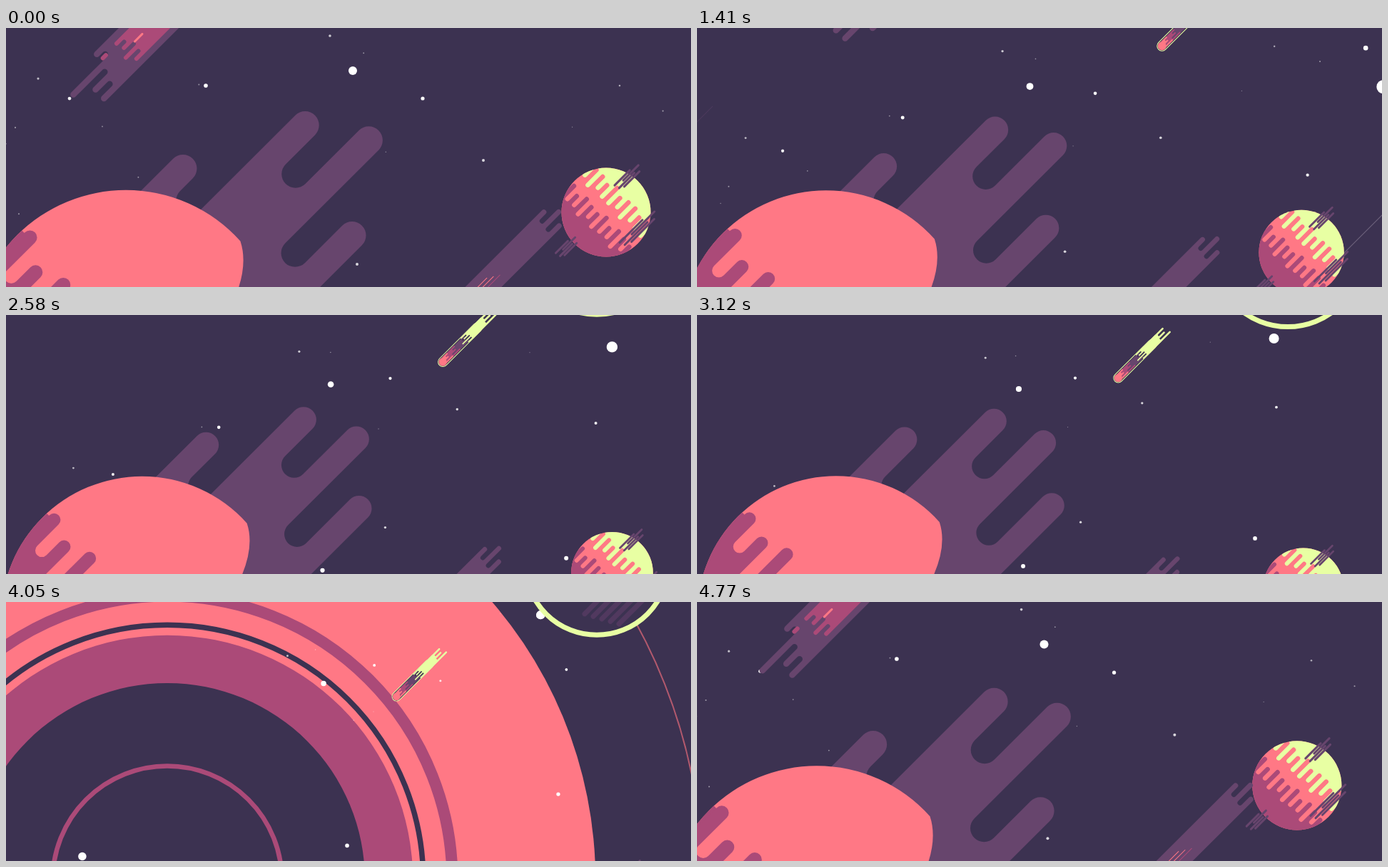
Write an HTML page with a canvas that moves like this. It is 960 by 364 pixels and loops after 4800 ms.

```html
<!DOCTYPE html>
<html lang="en">
<head>
<meta charset="utf-8">
<title>Space drift</title>
<style>
html, body { margin: 0; width: 100%; height: 100%; overflow: hidden; background: #3c3251; }
canvas { display: block; width: 960px; height: 364px; }
</style>
</head>
<body>
<canvas id="stage" width="960" height="364"></canvas>
<script>
const ctx = document.getElementById('stage').getContext('2d');
const W = 960, H = 364, CX = 480, CY = 182;
const LOOP = 4.8, CUT = 4.27, BLAST = 3.5;
const BG = '#3c3251', PLUM = '#67456d', PINK = '#ff7885', MAUVE = '#ab4a78', LIME = '#e8ffa3';
const TAU = Math.PI * 2, Q = Math.PI / 2;
const RING = { x: 226, y: 391, size: t => ((t - BLAST) / .55) ** 2 };

let seed = 11;
function rand() {
  seed = (seed * 16807) % 2147483647;
  return seed / 2147483647;
}

// Bright stars at time zero: x, y, radius. Faint ones are scattered.
const stars = [
  [45, 71, 1.6], [89, 99, 2.4], [280, 81, 2.8], [486, 60, 6], [454, 11, 1.8],
  [584, 99, 2.6], [669, 186, 2], [860, 81, 1.3], [492, 332, 2], [885, 285, 2.4],
  [1029, 104, 3.8], [1183, 168, 13.7], [-380, 107, 12], [780, 502, 3.8], [361, 381, 4]
];
for (let i = 0; i < 14; i++) stars.push([rand() * W, rand() * H, .6 + rand() * .5]);

// Local x runs up and right, local y down and right.
function at(x, y, scale, draw, dir = 1) {
  ctx.save();
  ctx.translate(x, y);
  ctx.rotate(-Math.PI / 4);
  ctx.scale(scale * dir, scale);
  draw();
  ctx.restore();
}

// Rounded fingers (even entries) and notches (odd entries).
function comb(color, ends, v, r, back) {
  ctx.beginPath();
  ctx.moveTo(back, v - r);
  ends.forEach((u, i) => ctx.arc(u, v + 2 * r * i, r, -Q, Q, i % 2 === 1));
  ctx.lineTo(back, v + r * (2 * ends.length - 1));
  ctx.fillStyle = color;
  ctx.fill();
}

function fingers(n, tip, notch, wobble, phase = 0) {
  return Array.from({ length: n }, (_, i) =>
    (i % 2 ? notch : tip) + wobble * Math.sin(i * 1.9 + phase));
}

function bar(color, u1, u2, v, w) {
  ctx.beginPath();
  ctx.moveTo(u1, v);
  ctx.lineTo(u2, v);
  ctx.lineCap = 'round';
  ctx.lineWidth = w;
  ctx.strokeStyle = color;
  ctx.stroke();
}

function disc(x, y, r, color) {
  ctx.beginPath();
  ctx.arc(x, y, r, 0, TAU);
  ctx.fillStyle = color;
  ctx.fill();
}

function ring(x, y, r, w, color) {
  ctx.beginPath();
  ctx.arc(x, y, r, 0, TAU);
  ctx.lineWidth = w;
  ctx.strokeStyle = color;
  ctx.stroke();
}

// The camera rolls and pulls back; larger stars are nearer, so they recede faster.
function drawStars(t, hole = 0) {
  for (const [x0, y0, r] of stars) {
    const k = 1 / (1 + (.03 + .02 * r) * t), a = -.13 * t;
    const c = Math.cos(a) * k, s = Math.sin(a) * k, dx = x0 - CX, dy = y0 - CY;
    const x = CX + dx * c - dy * s, y = CY + dx * s + dy * c;
    if (r < 3.5 && Math.hypot(x - RING.x, y - RING.y) < hole) continue;
    ctx.globalAlpha = Math.min(1, .2 + r * .3);
    disc(x, y, Math.max(.6, r * k), '#fff');
  }
  ctx.globalAlpha = 1;
}

function pop(t) {
  const a = t + .03;
  if (a < 0) return Math.max(0, 1 + .38 * a + 6.5 * a ** 3);
  return 1 + .38 * a * Math.exp(-a * a / .192);
}

function bigPlanet(t) {
  const k = 1 / (1 + .0302 * t), s = k * pop(t) / 1.011;
  if (s <= 0) return;
  const x = CX - 312 * k, y = CY + 261 * k, e = t > 0 ? t * t : 0;
  at(x, y, s, () => comb(PLUM, [
    230 + 3.8 * e, 205, 394 - .9 * e, 336 - 1.1 * e,
    442 - 2.7 * e, 257, 331 + 8 * t
  ], -117, 19.5, 0));
  ctx.save();
  ctx.translate(x, y);
  ctx.scale(s, s);
  ctx.beginPath();
  ctx.arc(0, 0, 215, Q, Math.atan2(-143, 160));
  ctx.quadraticCurveTo(172, -108, 151, -60);
  ctx.lineTo(100, 60);
  ctx.closePath();
  ctx.fillStyle = PINK;
  ctx.fill();
  ctx.clip();
  at(0, 0, 1, () => {
    const m = 1.6 * e;
    ctx.fillStyle = MAUVE;
    ctx.fillRect(-300, -225, 309, 22);
    comb(MAUVE, [10, m - 47, m - 19, -80, m - 4, -90, -40], -200, 10, -300);
  });
  ctx.restore();
}

function wisp(u, v, k) {
  for (let i = 0; i < 4; i++) {
    const shift = 7 * Math.sin(i * 2.6 + 5);
    bar(PLUM, u + (shift - 15) * k, u + (shift + 15) * k, v + (i - 1.5) * 3.6, 3);
  }
}

function smallPlanet(t) {
  const x = 841 + 5.6 * t - .9 * t * t, y = 259 + 40 * t, s = (62.5 - 2 * t) / 62.5;
  at(x, y, s, () => {
    ctx.save();
    disc(0, 0, 62.5, PINK);
    ctx.clip();
    comb(MAUVE, fingers(19, -9, -26, 4, 1), -58, 3.2, -90);
    ctx.scale(-1, 1);
    comb(LIME, fingers(19, -13, -31, 4, 4), -58, 3.2, -90);
    ctx.restore();
    wisp(57, -13, 1);
    wisp(16, 49, 1.5);
    wisp(-73, -4, .8);
  });
}

function topComet(t) {
  const lag = Math.exp(-4 * Math.max(t, -.2)), v = 116 + 5 * t;
  const tip = (base, slow) => -(base + 90 * t + slow * lag);
  at(0, 0, 1, () => {
    comb(PLUM, [tip(52, 12), tip(72, 0), tip(8.5, -8), tip(50, 4),
      tip(9.5, 18), tip(43, 4), tip(47, -20)], v, 4.25, -700);
    comb(MAUVE, fingers(7, tip(90, 4), tip(108, 0), 5), v + 9, 2.9, -700);
    bar(MAUVE, tip(36, 30), tip(42, 30), v + 10, 6);
    bar(PINK, tip(114, 0), tip(129, 0), v + 25, 3);
  }, -1);
}

function lowComet(t) {
  const u = 353 - 42 * t, v = 716 - 3.4 * t;
  at(0, 0, 1, () => {
    comb(PLUM, fingers(5, u + 4, u - 12, 8, 4.2), v, 3.6 - .12 * t, -300);
    for (let i = 0; i < 3; i++)
      bar(i < 2 ? PINK : MAUVE, u - 165 + 8 * i, u - 125 + 8 * i, v + 9 + 5 * i, 1);
  });
}

function limeComet(t) {
  const m = 18 * t + 3.95 * t * t;
  at(685 - m, -9 + m * 1.03, 1 + .04 * (3.12 - t), () => {
    ctx.beginPath();
    ctx.roundRect(-6.5, -6.5, 80, 13, 6.5);
    ctx.fillStyle = BG;
    ctx.fill();
    ctx.strokeStyle = LIME;
    ctx.lineWidth = 1;
    ctx.stroke();
    comb(PLUM, fingers(5, 44, 39, 2), -4, 1, 8);
    comb(MAUVE, fingers(5, 26, 19, 3), -4, 1, 5);
    comb(PINK, fingers(5, 12, 6, 3), -4, 1, 0);
    disc(0, 0, 5.6, PINK);
    comb(LIME, fingers(5, 93, 79, 4), -5, 1.3, 52);
    ctx.scale(-1, 1);
    comb(LIME, fingers(7, -41, -52, 4), -5.4, .9, -80);
  });
}

function limePlanet(t) {
  const a = t - 3.12, x = 828, y = -88.5 + 37 * a, r = 105 - 5 * a;
  if (y + r < -8) return;
  ctx.save();
  disc(x, y, r, BG);
  ctx.clip();
  at(x, y, 1, () => {
    const slide = 75 * Math.max(0, .93 - a);
    for (let i = 0; i < 5; i++) bar('#51395f', -62 + i * 6 + slide, 40, 38 + i * 11, 7);
  });
  ctx.restore();
  ring(x, y, r, 7, LIME);
}

function rings(t) {
  const { x, y } = RING, q = RING.size(t), w = Math.min(q, 1.5);
  if (q * 276 > 850) return;
  disc(x, y, 598 * q, PINK);
  ring(x, y, 747 * q, 2, '#b2596d');
  ring(x, y, 398 * q, 16 * w, MAUVE);
  ring(x, y, 357.5 * q, 7.5 * w, BG);
  disc(x, y, 343 * q, MAUVE);
  disc(x, y, 276 * q, BG);
  ring(x, y, 160 * q, 6.5 * w, MAUVE);
}

function streaks(t) {
  const a = 1 - Math.abs(t - 1.41) / .22, m = 110 * (t - 1.41);
  if (a <= 0) return;
  ctx.globalAlpha = .4 * a;
  at(905 + m, 318 - m, 1, () => bar('#b9aebf', 0, 90, 0, 1));
  at(-8 + m, 140 - m, 1, () => bar(PLUM, 0, 42, 0, 1));
  ctx.globalAlpha = 1;
}

function draw(now) {
  const clock = (Math.max(0, now - start) / 1000) % LOOP;
  const fresh = clock >= CUT, t = fresh ? clock - LOOP : clock;
  const blast = !fresh && clock > BLAST;
  ctx.fillStyle = BG;
  ctx.fillRect(0, 0, W, H);
  if (fresh) rings(clock);
  drawStars(t);
  streaks(t);
  topComet(t);
  smallPlanet(t);
  if (!blast) lowComet(t);
  bigPlanet(t);
  if (blast) {
    rings(clock);
    lowComet(t);
    drawStars(t, 343 * RING.size(clock));
  }
  limePlanet(t);
  limeComet(t);
  requestAnimationFrame(draw);
}

const start = performance.now();
draw(start);
</script>
</body>
</html>
```
